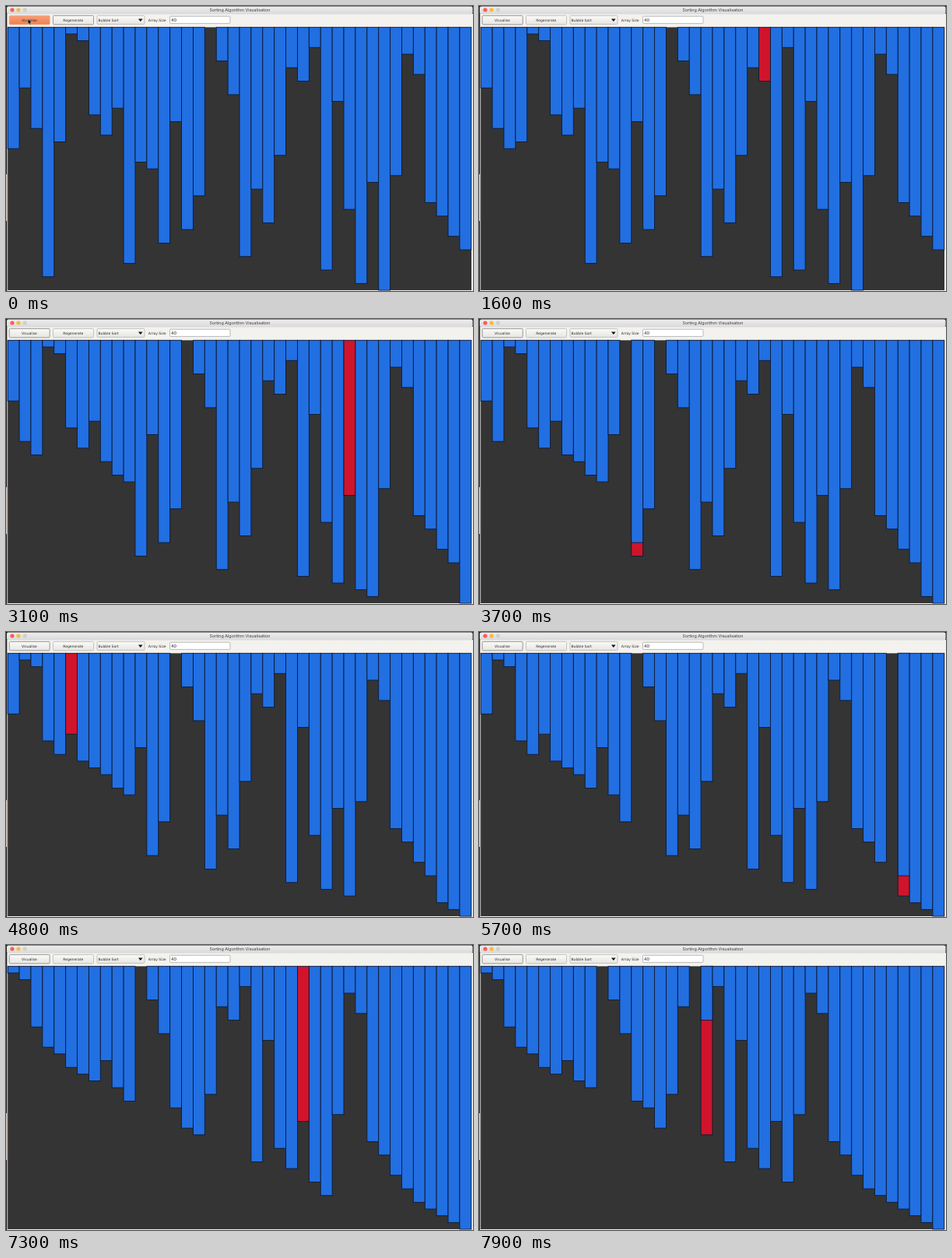
Recreate the animation shown at these times as an HTML page with a canvas. Size 600x366 px, loop 8000 ms.

```html
<!DOCTYPE html>
<html lang="en">
<head>
<meta charset="utf-8">
<title>Sorting Algorithm Visualisation</title>
<style>
  html, body { margin: 0; width: 100%; height: 100%; overflow: hidden; background: #f4f2ee; }
  svg, canvas { position: absolute; left: 0; top: 0; display: block; }
  text { font: 4.5px "DejaVu Sans", sans-serif; fill: #2a2a2a; }
  .title { font: 5.4px Inter, sans-serif; fill: #3c3c3c; }
  .field { font-size: 5.5px; }
  .mid { text-anchor: middle; }
  .box { fill: url(#face); stroke: #b9b7b3; stroke-width: .8; }
  .start .box, .hot .next .box { stroke: #858585; }
  .hot .start .box { fill: url(#glow); stroke: #f3a381; }
</style>
</head>
<body>
<canvas id="stage" width="600" height="366"></canvas>
<svg width="600" height="366" viewBox="0 0 600 366">
  <defs>
    <linearGradient id="bar" x2="0" y2="1">
      <stop stop-color="#eeeeee"/><stop offset="1" stop-color="#d9d9d9"/>
    </linearGradient>
    <linearGradient id="face" x2="0" y2="1">
      <stop stop-color="#fafaf8"/><stop offset="1" stop-color="#e6e5e2"/>
    </linearGradient>
    <linearGradient id="glow" x2="0" y2="1">
      <stop stop-color="#f7a077"/><stop offset="1" stop-color="#ee7f50"/>
    </linearGradient>
  </defs>
  <path d="M0 0H600V10H0Z" fill="#222"/>
  <rect x="1" y=".5" width="598.5" height="10" rx="2" fill="url(#bar)"/>
  <circle cx="8" cy="5" r="2.6" fill="#fc5b57"/>
  <circle cx="16" cy="5" r="2.6" fill="#fdb93d"/>
  <circle cx="24.3" cy="5" r="2.6" fill="#cfcfcf"/>
  <text class="title mid" x="300.5" y="7">Sorting Algorithm Visualisation</text>

  <g id="buttons">
    <g class="start">
      <rect class="box" x="4.2" y="12.4" width="52" height="11.4" rx="1.2"/>
      <text class="mid" x="30" y="20">Visualise</text>
    </g>
    <g class="next">
      <rect class="box" x="60.5" y="12.4" width="52" height="11.4" rx="1.2"/>
      <text class="mid" x="86.3" y="20">Regenerate</text>
    </g>
  </g>
  <rect class="box" x="117" y="12.4" width="61" height="11" rx="1.2"/>
  <text x="118.5" y="19.6">Bubble Sort</text>
  <path d="M170 16.4H175.6L172.8 20Z" fill="#111"/>
  <text x="182.8" y="19.8">Array Size</text>
  <rect x="210.5" y="13.2" width="77.5" height="9.2" rx="1" fill="#fff" stroke="#aaa" stroke-width=".8"/>
  <text class="field" x="212" y="20">40</text>

  <path id="cursor" d="M0 0V9L2.1 7.2L3.5 10.3L5 9.6L3.6 6.6H6.4Z" fill="#000" stroke="#fff" stroke-width=".5"/>
</svg>
<script>
const LOOP = 8000, TICK = 100;
const LEFT = 2.2, TOP = 27.3, RIGHT = 598, BOTTOM = 365;
const BAR_W = 14.89, UNIT = 8.66;
const BLUE = '#226fe2', RED = '#d0142b';
const START = [18, 9, 15, 37, 17, 1, 2, 13, 16, 12, 35, 20, 21, 32, 14, 30, 25, 0, 5, 10,
  34, 24, 29, 19, 6, 8, 3, 36, 11, 27, 38, 23, 39, 22, 4, 7, 26, 28, 31, 33];

// [time in ms, swaps done]
const PACE = [[850, 0], [1200, 10.75], [1300, 10.75], [1600, 23.75], [2500, 46.75],
  [3700, 74.25], [4800, 98.75], [6700, 142.25], [7900, 169.25]];

const ctx = document.getElementById('stage').getContext('2d');
const cursor = document.getElementById('cursor');
const buttons = document.getElementById('buttons');

// Every swap of the bubble sort, with the order of bars before it.
function bubbleSwaps(list) {
  const a = [...list], swaps = [];
  for (let end = a.length - 1; end > 0; end--) {
    for (let j = 0; j < end; j++) {
      if (a[j] <= a[j + 1]) continue;
      swaps.push({ j, before: [...a] });
      [a[j], a[j + 1]] = [a[j + 1], a[j]];
    }
  }
  return swaps;
}
const swaps = bubbleSwaps(START);

function swapsAt(t) {
  if (t < PACE[0][0]) return -1;
  const i = PACE.findIndex(([time]) => time >= t);
  const [t0, s0] = PACE[i - 1], [t1, s1] = PACE[i];
  return s0 + (s1 - s0) * (t - t0) / (t1 - t0);
}

function drawBar(i, value, color) {
  if (!value) return;
  const box = [LEFT + i * BAR_W, TOP, BAR_W, value * UNIT];
  ctx.fillStyle = color;
  ctx.fillRect(...box);
  ctx.strokeRect(...box);
}

function drawBars(progress) {
  const n = Math.floor(progress);
  if (n < 0) return START.forEach((v, i) => drawBar(i, v, BLUE));
  const { j, before } = swaps[n];
  const bars = [...before];
  const halfway = progress - n < 0.5;
  if (halfway) {
    // the larger bar has slid behind its neighbour
    drawBar(j + 1, before[j], RED);
    bars[j] = 0;
  } else {
    [bars[j], bars[j + 1]] = [before[j + 1], before[j]];
  }
  bars.forEach((v, i) => drawBar(i, v, !halfway && i === j ? RED : BLUE));
}

function fill(color, x, y, w, h) {
  ctx.fillStyle = color;
  ctx.fillRect(x, y, w, h);
}

function drawWindow() {
  fill('#f4f2ee', 0, 0, 600, 366);
  fill('#1c1c1e', 0, 0, 1.3, 366);
  fill('#cdb9b6', 0, 216, 1.3, 60);
  fill('#343434', LEFT, TOP, RIGHT - LEFT, BOTTOM - TOP);
}

function drawPointer(t) {
  const p = Math.min(1, Math.max(0, t / 700));
  const ease = p * p * (3 - 2 * p);
  cursor.setAttribute('transform', `translate(${28.3 + 574 * ease} ${16.6 + 303 * ease}) scale(.75)`);
  buttons.setAttribute('class', t < 200 ? 'hot' : '');
}

function render(now) {
  const t = Math.floor(now % LOOP / TICK) * TICK;
  drawWindow();
  ctx.strokeStyle = '#0c1a33';
  ctx.lineWidth = 0.9;
  drawBars(swapsAt(t));
  drawPointer(t);
}

const begin = performance.now();
function loop() {
  render(performance.now() - begin);
  requestAnimationFrame(loop);
}
loop();
</script>
</body>
</html>
```
